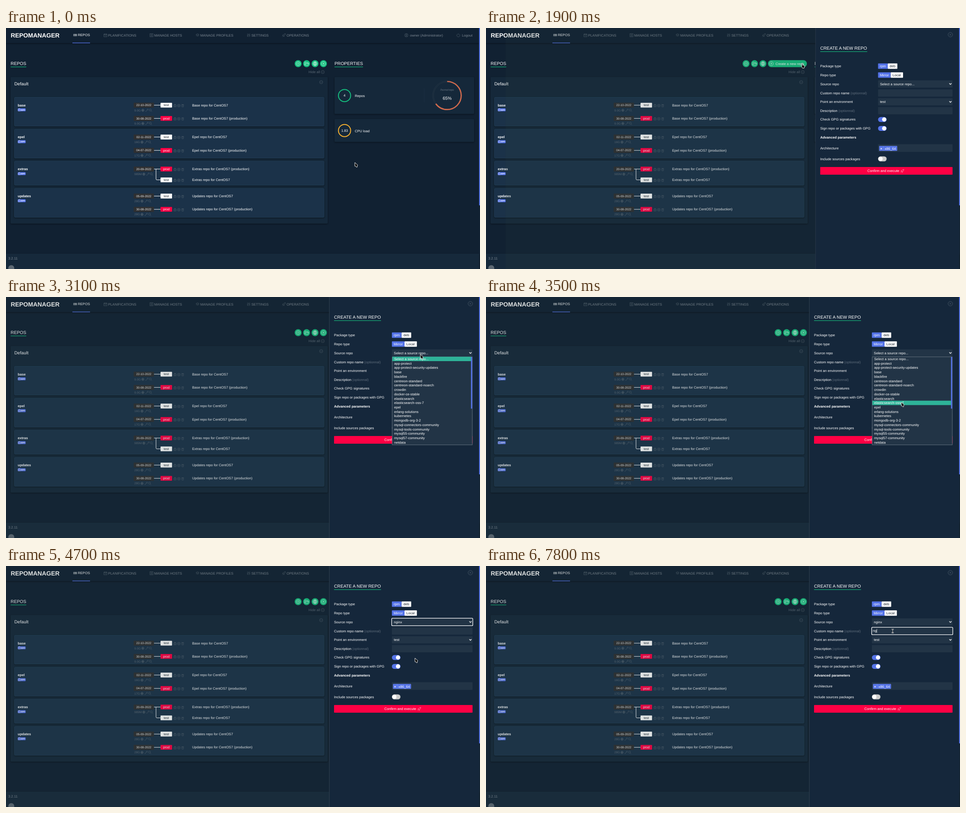
Write an HTML page that moves like this. It is 1049 px wide and 534 px high and loops after 8000 ms.

```html
<!DOCTYPE html>
<html lang="en">
<head>
<meta charset="utf-8">
<title>Repository manager</title>
<style>
html, body { margin: 0; width: 100%; height: 100%; overflow: hidden; background: #112132; }
svg { font-family: "Liberation Sans", Arial, sans-serif; text-rendering: geometricPrecision; }
#stage { display: block; width: 100vw; height: 100vh; }
.shadow { filter: drop-shadow(0 1px 1.8px rgba(0, 0, 0, .5)); }
</style>
</head>
<body>
<svg id="stage" viewBox="0 0 1049 534"></svg>
<script>
const LOOP = 8000, STEP = 100;
const BODY = '#112132', BOX = '#15283a', ROW = '#1b3249', FIELD = '#223446';
const BLUE = '#5473e8', GREEN = '#15bf7f', RED = '#ff0044', MUTED = '#7b8691', FAINT = '#5a6875';
const SMALL = 6.56, NORMAL = 7.65, LARGE = 9.83;

// Drawing helpers; text and icons are placed by their vertical centre.
const text = (x, y, str, fill = '#fff', size = NORMAL, more = '') =>
  `<text x="${x}" y="${y + size * .35}" fill="${fill}" font-size="${size}" ${more}>${str}</text>`;
const centred = (x, y, str, fill, size) => text(x, y, str, fill, size, 'text-anchor="middle"');
const bold = (x, y, str) => text(x, y, str, '#fff', NORMAL, 'font-weight="bold"');
const rect = (x, y, w, h, fill, more = '') =>
  `<rect x="${x}" y="${y}" width="${Math.max(0, w)}" height="${h}" fill="${fill}" ${more}/>`;
const line = (d, color = '#fff', width = 1) =>
  `<path d="${d}" fill="none" stroke="${color}" stroke-width="${width}"/>`;
const circle = (x, y, r, fill, more = '') => `<circle cx="${x}" cy="${y}" r="${r}" fill="${fill}" ${more}/>`;
const ring = (x, y, r, color, width, more = '') =>
  circle(x, y, r, 'none', `stroke="${color}" stroke-width="${width}" ${more}`);
const icon = (x, y, name, color = FAINT, width = .6) =>
  `<g transform="translate(${x} ${y})">${line(ICONS[name], color, width)}</g>`;
const title = (x, y, str, width) =>
  text(x, y, str, '#fff', LARGE) + rect(x, y + 7.4, width, 1.1, GREEN);

const round = r => `M${-r} 0a${r} ${r} 0 1 0 ${2 * r} 0a${r} ${r} 0 1 0 ${-2 * r} 0`;
const ICONS = {
  server: 'M-3.5 -2.2h7v2h-7zM-3.5 -.2h7v2.2h-7zM-2 -1.2h1M0 -1.2h2.5M-2 .9h1M0 .9h2.5',
  calendar: 'M-3.5 -2.5h7v6h-7zM-3.5 -1h7M-1.8 -3.7v2M1.8 -3.7v2M-1.5 1h3',
  list: 'M-3.5 -3.5h7v7h-7zM-2 -1.7h4M-2 0h4M-2 1.7h4',
  stack: 'M-3.5 -1.5L0 -3.2L3.5 -1.5L0 .2ZM-3.5 .5L0 2.2L3.5 .5',
  sliders: 'M-2.5 -3.5v7M0 -3.5v7M2.5 -3.5v7M-3.3 1.5h1.6M-.8 -1.5h1.6M1.7 .5h1.6',
  rocket: 'M3.5 -3.5Q0 -3.5 -2 .5L-.5 2Q3.5 0 3.5 -3.5M-1.5 -.7L-3.3 .3L-2 .8M.7 1.5L0 3.3L-.7 2M-2 2L-3.5 3.5',
  user: round(3.8) + 'M-1.4 -.9a1.4 1.4 0 1 0 2.8 0a1.4 1.4 0 1 0 -2.8 0M-2.4 2.6Q0 -.2 2.4 2.6',
  power: 'M-1.8 -2.6a3.4 3.4 0 1 0 3.6 0M0 -4v3.5',
  gear: round(4.1) + round(1.5) + 'M0 -4.9v1M0 3.9v1M-4.9 0h1M3.9 0h1M-3.4 -3.4l.7 .7M2.7 2.7l.7 .7M-3.4 3.4l.7 -.7M2.7 -2.7l.7 -.7',
  folder: 'M-4 3.3V-3.3h2.7l1 1.2h3.8v1.6M-4 3.3L-2.5 -.5H5L3.5 3.3Z',
  globe: round(4.4) + 'M-4.4 0h8.8M0 -4.4v8.8M-3.5 -2.4h7M-3.5 2.4h7M0 -4.4Q-4 0 0 4.4Q4 0 0 -4.4',
  plus: round(4.4) + 'M-2.2 0h4.4M0 -2.2v4.4',
  chevron: round(3.5) + 'M-1.5 -.6L0 .9L1.5 -.6',
  close: round(5) + 'M-2 -2L2 2M2 -2L-2 2',
  box: 'M-2.5 -1.5h5v4h-5zM-1 -1.5v-1.2h2v1.2M0 0v2',
  cross: round(3) + 'M-1.5 -1.5L1.5 1.5M1.5 -1.5L-1.5 1.5',
  bin: 'M-2 -1.2h4l-.4 4h-3.2zM-2.6 -2.4h5.2',
  disc: round(2.8) + 'M-2.8 0h5.6M0 -2.8v5.6' + round(1.2),
  key: 'M-3 3L1 -1M-1.8 1.8l1 1M1 -1a1.4 1.4 0 1 0 1 -2a1.4 1.4 0 0 0 -1 2',
  lens: 'M-2.6 -.6a2.2 2.2 0 1 0 4.4 0a2.2 2.2 0 1 0 -4.4 0M1.2 1.2L3.2 3.2'
};

const NAV = [
  [216, 'PLANIFICATIONS', 'calendar'], [318, 'MANAGE HOSTS', 'list'], [420, 'MANAGE PROFILES', 'stack'],
  [533, 'SETTINGS', 'sliders'], [611, 'OPERATIONS', 'rocket'],
  [882, 'owner (Administrator)', 'user'], [997, 'Logout', 'power']
];
const REPOS = [
  { name: 'base', top: 153, height: 64, envs: [[171, 'test', '22-10-2022', '9.0G', 14.2], [200.3, 'prod', '30-08-2022', '9.0G', 14.2]] },
  { name: 'epel', top: 224, height: 64, envs: [[241.6, 'test', '02-11-2022', '16G', 12.4], [271.2, 'prod', '04-07-2022', '17G', 12.4]] },
  { name: 'extras', top: 294.5, height: 53.5, envs: [[312.5, 'prod', '20-09-2022', '989M', 16.4], [336.5, 'test']] },
  { name: 'updates', top: 355, height: 64, envs: [[372.4, 'test', '05-09-2022', '28G', 12.4], [401.8, 'prod', '30-08-2022', '28G', 12.4]] }
];
const SOURCES = ('Select a source repo...,app-protect,app-protect-security-updates,base,blackfire,centreon-standard,' +
  'centreon-standard-noarch,crowdin,docker-ce-stable,elasticsearch,elasticsearch-oss-7,epel,erlang-solutions,' +
  'kubernetes,mongodb-org-3-2,mysql-connectors-community,mysql-tools-community,mysql55-community,' +
  'mysql57-community,netdata,newrelic,nginx,nginx-plus,nodesource-10,nodesource-11,nodesource-12,' +
  'nodesource-13,nodesource-14,nodesource-16,passenger,rabbitmq_erlang,rabbitmq_server-noarch,' +
  'wandisco-git,yarn').split(',');

function environment(repo, [y, env, date, size, sizeWidth]) {
  const isProd = env === 'prod';
  const label = repo[0].toUpperCase() + repo.slice(1) + ' repo for CentOS7' + (isProd ? ' (production)' : '');
  let out = '';
  if (date) {
    const after = 284 + sizeWidth + 4.6;
    out += rect(282.5, y - 5.6, 45, 11.2, '#2e2f31', 'rx="1"') + centred(305, y, date, '#f0f0f0', SMALL)
      + line(`M327.5 ${y}H342`) + text(284, y + 11.3, size, FAINT, SMALL)
      + icon(after, y + 11.3, 'disc') + icon(after + 8.7, y + 11.3, 'key') + icon(after + 17, y + 11.3, 'lens');
  } else out += line(`M332 ${y - 24}V${y - 2}Q332 ${y} 334 ${y}H342`);
  return out + rect(342, y - 5.3, 25.5, 10.6, isProd ? RED : '#fff', 'rx="1"')
    + centred(354.8, y, env, isProd ? '#fff' : '#1a2530', 7.1)
    + ['box', 'cross', 'bin'].map((name, i) => icon(374 + 8.5 * i, y + 1, name)).join('')
    + text(412, y, label);
}

const repoRow = ({ name, top, height, envs }) =>
  rect(18.5, top + .5, 685.5, height, ROW, 'rx="2" stroke="#234059" stroke-width=".8" class="shadow"')
  + bold(26, envs[0][0], name)
  + rect(26, envs[0][0] + 7, 17.5, 6.6, BLUE, 'rx="1.5"') + icon(29.5, envs[0][0] + 10.3, 'box', '#fff', .4)
  + text(33, envs[0][0] + 10, 'rpm', '#fff', 4.8, 'font-weight="bold" font-style="italic"')
  + envs.map(env => environment(name, env)).join('');

const card = (x, y, w, h) => rect(x, y, w, h, BOX, 'rx="2" class="shadow"');

const PAGE = rect(0, 0, 1049, 534, BODY)
  + rect(0, 0, 1047, 33.5, BODY, 'class="shadow"')
  + text(10.5, 16, 'REPOMANAGER', '#fff', 13.5, 'font-weight="bold"')
  + icon(153, 15.8, 'server', '#cfd5da') + text(159, 15.6, 'REPOS') + rect(147, 32.4, 39, 1.3, BLUE)
  + NAV.map(([x, label, name]) => icon(x + 4, 16, name, FAINT) + text(x + (x > 800 ? 12 : 10), 16, label, MUTED)).join('')
  + title(10.3, 78.3, 'REPOS', 34.5) + title(727, 78.3, 'PROPERTIES', 63)
  + text(669.5, 97.3, 'Hide all', FAINT) + icon(701, 97.6, 'chevron')
  + card(10, 108.5, 702, 325) + text(18.5, 123.8, 'Default', '#fff', LARGE) + icon(697.5, 120, 'chevron')
  + REPOS.map(repoRow).join('')
  + card(727, 108.5, 309, 82) + card(727, 201.5, 309, 51)
  + ring(749.2, 149.7, 13.5, GREEN, 2) + centred(749.2, 149.5, '4') + text(772, 150.3, 'Repos')
  + ring(749.2, 227.2, 13.5, '#f7b02f', 2) + centred(749.4, 227.2, '1.83') + text(772, 228, 'CPU load')
  + rect(925, 134, .6, 31, '#1d3246')
  + ring(976.3, 149.6, 32.2, '#33424f', .5) + ring(976.3, 149.6, 30, '#33424f', .5)
  + ring(976.3, 149.6, 31.1, '#d0694c', 2.7, 'pathLength="100" stroke-dasharray="65 100" transform="rotate(-90 976.3 149.6)"')
  + centred(976.3, 136.6, '/home/repo', '#66737f', 6.01) + centred(976.3, 156, '65%', '#fff', LARGE)
  + rect(0, 500, 1047, 34, '#16293b', 'class="shadow"')
  + text(5, 510.7, '3.2.11', MUTED) + circle(11.7, 532, 6.6, '#5d6974');

// Motion: everything below depends on the time alone.
const ramp = (t, from, to) => Math.min(1, Math.max(0, (t - from) / (to - from)));
const swing = p => .5 - Math.cos(p * Math.PI) / 2;

const PATH = [
  [200, 772, 298], [1100, 699, 78], [1900, 699, 78], [2400, 885, 132], [2700, 885, 132], [2800, 917, 127],
  [3100, 917, 127], [3500, 919, 233], [3600, 919, 233], [4000, 921, 239], [4400, 905, 204],
  [5000, 905, 204], [5600, 900, 144]
];
function cursorAt(t) {
  const i = PATH.findIndex(([time]) => time > t);
  if (i === 0) return PATH[0].slice(1);
  if (i < 0) return PATH[PATH.length - 1].slice(1);
  const [t0, x0, y0] = PATH[i - 1], [t1, x1, y1] = PATH[i];
  const p = swing(ramp(t, t0, t1));
  return [x0 + (x1 - x0) * p, y0 + (y1 - y0) * p];
}

function buttons(t) {
  const open = t < 1900 ? ramp(t, 1080, 1290) : 1 - ramp(t, 2000, 2250);
  const left = 694.8 - 71 * open;
  return ['gear', 'folder', 'globe'].map((name, i) =>
    circle(left - 48.3 + 18.7 * i, 79, 7.7, GREEN) + icon(left - 48.3 + 18.7 * i, 79, name, '#d6f5e8', .7)).join('')
    + rect(left, 71.3, 710.2 - left, 15.4, GREEN, 'rx="7.7"') + icon(left + 7.7, 79, 'plus', '#d6f5e8', .7)
    + `<svg x="${left}" y="71" width="${Math.max(1, 708 - left)}" height="16">`
    + (open ? text(17, 8, 'Create a new repo') : '') + '</svg>';
}

function form(t, left) {
  const x = left + 11, field = left + 139, end = 1032.5, middle = (x + end) / 2;
  const optional = ' <tspan fill="#5f6d7b">(optionnal)</tspan>';
  const labels = [[84.6, 'Package type'], [104.2, 'Repo type'], [124, 'Source repo'], [144, 'Custom repo name' + optional],
    [163.6, 'Point an environment'], [183.4, 'Description' + optional], [202.8, 'Check GPG signatures'],
    [222.5, 'Sign repo or packages with GPG'], [266.4, 'Architecture'], [290, 'Include sources packages']];
  const input = (y, h = 16) => rect(field, y - h / 2, end - field, h, FIELD, 'rx="1"');
  const select = (y, value) => input(y) + text(field + 4.3, y, value) + line(`M1025.3 ${y - 1.5}l2.5 2.6l2.5 -2.6`, '#fff', 1.3);
  const choice = (y, a, b, split, width) => rect(field, y - 6, split, 12, BLUE, 'rx="1"')
    + rect(field + split, y - 6, width - split, 12, '#fff', 'rx="1"')
    + text(field + 4, y, a) + text(field + split + 4, y, b, '#1a2530');
  const toggle = (y, on) => rect(field, y - 5.5, 19, 11, on ? BLUE : '#ccc', 'rx="5.5"')
    + circle(field + (on ? 13.6 : 5.5), y, 4.7, '#fff');
  const focus = y => rect(field - .5, y - 8.4, end - field + 1, 16.8, 'none', 'rx="2" stroke="#fff" stroke-width="1.3"');

  const typed = 'ng'.slice(0, t < 7700 ? 0 : t < 7800 ? 1 : 2);
  const caretOn = t >= 5600 && !(t >= 6500 && t < 6900) && !(t >= 7500 && t < 7700);
  return icon(1027.7, 14.8, 'close', '#4d5c6b', .8) + title(x, 44.4, 'CREATE A NEW REPO', 104)
    + labels.map(([y, label]) => text(x, y, label)).join('') + bold(x, 242.4, 'Advanced parameters')
    + choice(84.6, 'rpm', 'deb', 21.5, 42.7) + choice(104.2, 'Mirror', 'Local', 28, 55.3)
    + select(124, t < 4700 ? SOURCES[0] : 'nginx') + input(144) + select(163.6, 'test') + input(183.2)
    + toggle(202.8, true) + toggle(222.5, true) + toggle(290, false)
    + input(266, 17) + rect(field + 2.6, 261.4, 39.6, 10.6, BLUE, 'rx="1" stroke="#7f97ee" stroke-width=".4"')
    + bold(field + 4.8, 267, '×') + rect(field + 11.6, 262, .5, 9.5, '#91a5f1') + text(field + 14.6, 266.9, 'x86_64')
    + rect(x, 308, end - x, 17, RED, 'rx="1"') + text(middle - 42, 316.6, 'Confirm and execute')
    + icon(middle + 35.3, 316.8, 'rocket', '#ffb3c7', .7)
    + (t >= 4700 && t < 5600 ? focus(124) : '') + (t >= 5600 ? focus(144) : '')
    + text(field + 2, 143.6, typed) + (caretOn ? rect(field + 2.1 + 4.25 * typed.length, 139.4, .7, 8.6, '#fff') : '');
}

function dropdown(t, cursorY) {
  const pitch = 9.74, first = 137.2;
  const scroll = Math.round(14 * swing(ramp(t, 3500, 4000)));
  const scrolling = t >= 3500 && t <= 4000;
  const hovered = scrolling ? 10 : Math.max(0, Math.round((cursorY + 2 - first) / pitch)) + scroll;
  let out = rect(854.7, 132.7, 177.3, 195, FIELD, 'stroke="#73808c" stroke-width=".8"');
  SOURCES.slice(scroll, scroll + 20).forEach((name, i) => {
    const y = first + pitch * i;
    if (i + scroll === hovered) out += rect(855.1, y - pitch / 2, 174, pitch, '#2eb398');
    out += text(859, y, name);
  });
  return out + rect(1029, 133 + scroll * 5.74, 2.7, 114.3, BLUE);
}

function cursor(t, [x, y]) {
  if (t >= 5400) {
    const beam = `M${x - 2.3} ${y - 4}q2.3 0 2.3 1.5v5q0 1.5 -2.3 1.5M${x + 2.3} ${y - 4}q-2.3 0 -2.3 1.5v5q0 1.5 2.3 1.5`;
    return line(beam, '#fff', 1.6) + line(beam, '#111', .5);
  }
  const hand = t >= 1100 && t < 2000;
  const shape = hand ? 'M0 .5Q1 -.8 2 .5V4L5.5 5Q6.5 5.5 6 8L5 11H1.5L-1 7Q-1.3 6 0 6Z'
    : 'M0 0V8.2L1.8 8.2L3.2 10.2H5.2V8L6.4 5.6Z';
  return `<path transform="translate(${x} ${y})" d="${shape}" fill="#111" stroke="#fff" stroke-width=".9" stroke-linejoin="round"/>`;
}

function scene(t) {
  const open = swing(ramp(t, 1552, 1952)), left = 1047 - 332 * open, pointer = cursorAt(t);
  let out = PAGE + buttons(t);
  if (open) {
    out += rect(1049 * (1 - open), 0, 1049 * open, 534, 'rgba(45,62,64,.15)')
      + `<svg x="${left}" width="${1047 - left}" height="534" viewBox="${left} 0 ${1047 - left} 534">`
      + rect(left, 0, 1047 - left, 534, '#15273b') + rect(left, 0, .9, 534, '#34424f') + form(t, left) + '</svg>';
  }
  if (t >= 3100 && t < 4700) out += dropdown(t, pointer[1]);
  return out + rect(1047, 0, 2, 393, BLUE) + cursor(t, pointer);
}

const stage = document.getElementById('stage');
const start = performance.now();
let shown = -1;
function play() {
  const t = Math.floor((performance.now() - start) % LOOP / STEP) * STEP;
  if (t !== shown) stage.innerHTML = scene(shown = t);
  requestAnimationFrame(play);
}
play();
</script>
</body>
</html>
```
